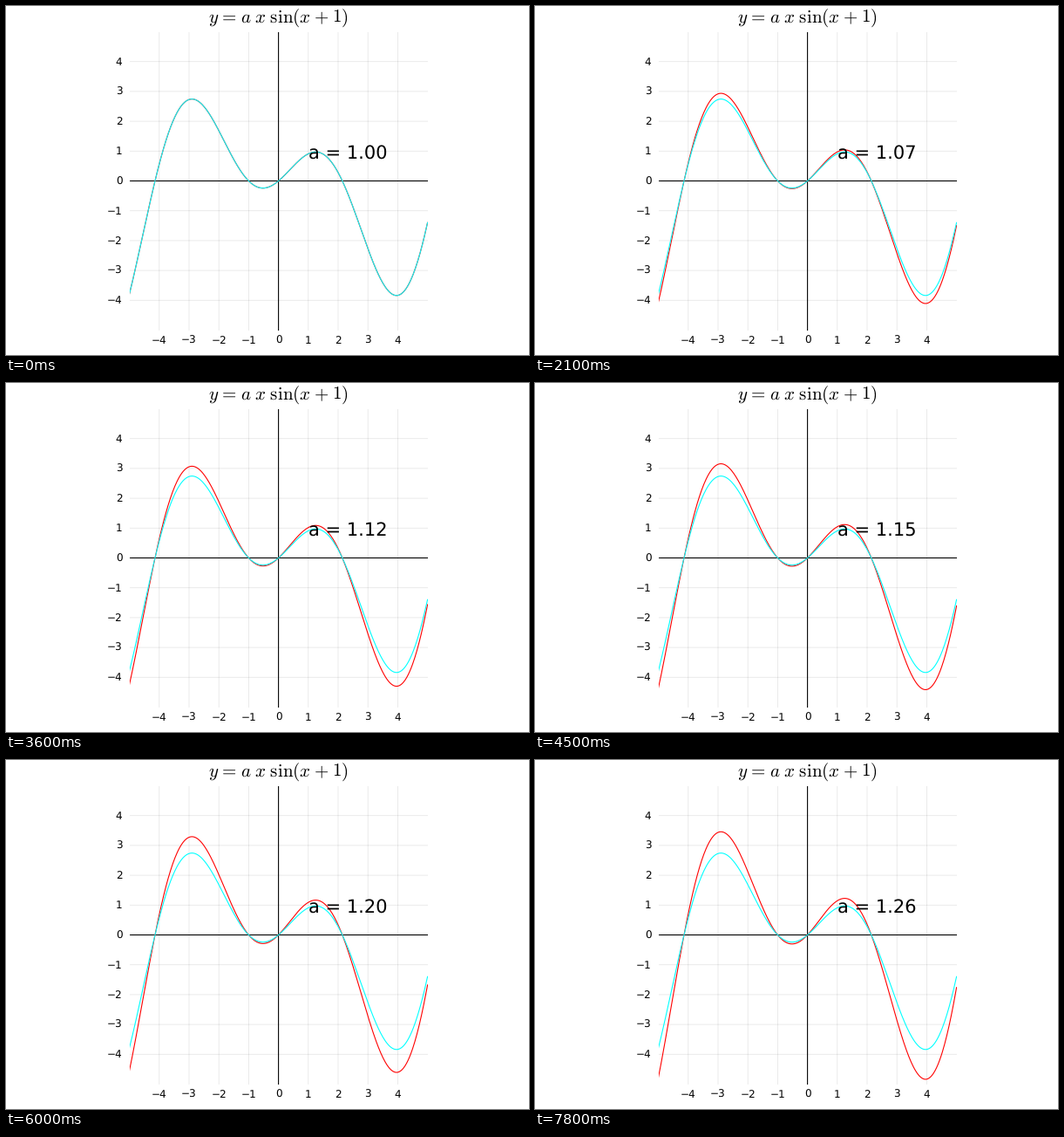
A matplotlib script for the animation above (8000 ms loop, 600 by 400 pixels).

```python
import numpy as np
import matplotlib.pyplot as plt
from matplotlib.animation import FuncAnimation
from matplotlib.transforms import Affine2D

WIDTH, HEIGHT, DPI = 600, 400, 100
PX = 72 / DPI  # points per pixel
LEFT, TOP, UNIT = 141.6, 29.5, 34.2
X0, Y0 = LEFT + 5 * UNIT, TOP + 5 * UNIT
INTERVAL, FRAMES, HOLD = 100, 80, 3

plt.rcParams.update({"font.family": "DejaVu Sans", "mathtext.fontset": "cm",
                     "text.hinting": "none"})

fig = plt.figure(figsize=(WIDTH / DPI, HEIGHT / DPI), dpi=DPI, facecolor="white")
side = 10 * UNIT
ax = fig.add_axes([LEFT / WIDTH, 1 - (TOP + side) / HEIGHT,
                   side / WIDTH, side / HEIGHT])
ax.set(xlim=(-5, 5), ylim=(-5, 5))
ax.axis("off")

# Pixel coordinates with the origin at the top left
pixels = Affine2D().scale(1 / WIDTH, -1 / HEIGHT).translate(0, 1) + fig.transFigure


def label(x, y, text, size, ha="center"):
    return ax.text(x, y, text, fontsize=size * PX, ha=ha, va="baseline",
                   transform=pixels, zorder=5)


def rules(value, width, zorder, alpha=1):
    style = dict(color="black", lw=width * PX, alpha=alpha, zorder=zorder, snap=False)
    ax.axvline(value, **style)
    ax.axhline(value, **style)


for tick in range(-4, 5):
    if tick:
        rules(tick, 0.8, 1, 0.1)
    name = str(tick).replace("-", "\u2212")
    label(X0 + tick * UNIT, 387, name, 12)
    label(133.4, Y0 - tick * UNIT + 4, name, 12, "right")
rules(0, 1.1, 2)

title = r"$y\hspace{0.1}=\hspace{0.1}a\;x\;\sin(x\hspace{0.05}+\hspace{0.05}1)$"
label(X0 - 0.2, 18.5, title, 21)
readout = label(X0 + UNIT, 174.3, "", 21, "left")

x = np.linspace(-5, 5, 401)
base = x * np.sin(x + 1)
scaled, = ax.plot(x, base, color="red", lw=1.1 * PX, zorder=3)
ax.plot(x, base, color="cyan", lw=1.1 * PX, zorder=4)


def update(frame):
    a = 1 + 0.01 * (frame // HOLD)
    scaled.set_ydata(a * base)
    readout.set_text(f"a = {a:.2f}")
    return scaled, readout


anim = FuncAnimation(fig, update, frames=FRAMES, interval=INTERVAL,
                     repeat=True, repeat_delay=0, blit=False)
plt.show()
```
